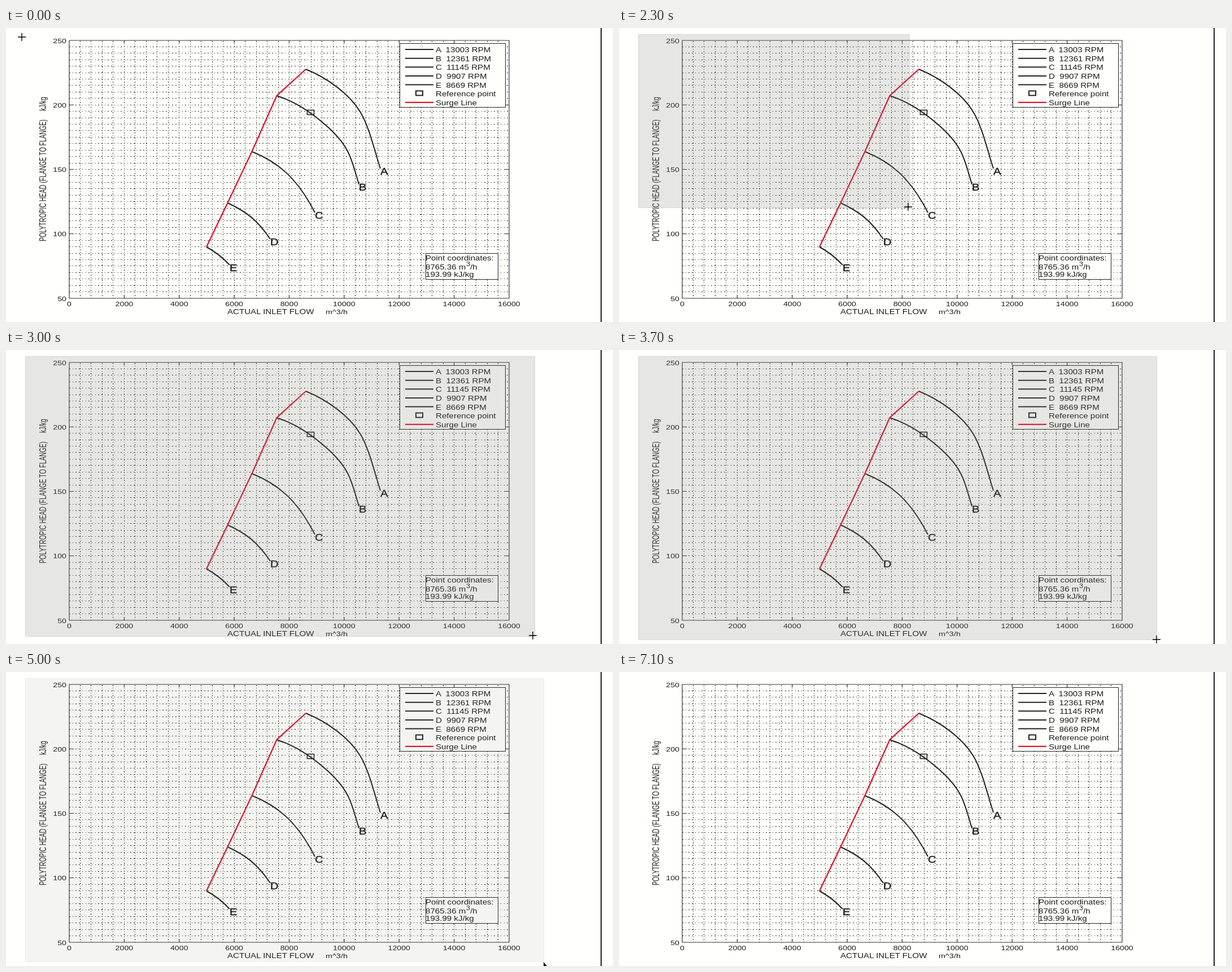
Write an HTML page that moves like this. It is 1075 px wide and 521 px high and loops after 7500 ms.

```html
<!DOCTYPE html>
<html lang="en">
<head>
<meta charset="utf-8">
<title>Compressor map</title>
<style>
html, body { margin: 0; width: 100%; height: 100%; overflow: hidden; background: #fffffb; }
svg { display: block; width: 1075px; height: 521px; }
text { font: 12px "Liberation Sans", Arial, sans-serif; fill: #1c1c1c; white-space: pre; }
.line { fill: none; stroke: #20241e; stroke-width: 2; }
.red { fill: none; stroke: #e2142e; stroke-width: 2.3; }
.frame { fill: #fffffb; stroke: #222; }
.grid { fill: none; stroke: #222; shape-rendering: crispEdges; }
.columns { stroke-dasharray: 1.2 3.3; }
.rows { stroke-dasharray: 1.5 4.2; }
.axis { fill: none; stroke: #333; stroke-width: 1.2; }
.mark { stroke: #1c1c1c; stroke-width: .4; }
#selection { fill: rgb(130 132 132 / .2); stroke: rgb(110 110 110 / .22); }
</style>
</head>
<body>
<svg viewBox="0 0 1075 521">
  <g id="chart"></g>
  <g class="line">
    <path class="curve" d="M531 73C570 89 608 117 627 148C643 174 652 215 663 249"/>
    <path class="curve" d="M479.5 120C515 131 546 153 576 181C609 213 612 233 625 277"/>
    <path class="curve" d="M435.5 219C480 237 515 264 547 327"/>
    <path class="curve" d="M392.5 310C425 325 445 340 468 374"/>
    <path class="curve" d="M355 388C372 397 384 407 396 420"/>
    <rect x="533.5" y="145.5" width="12" height="8" stroke-width="1.6"/>
  </g>
  <path class="red" d="M355 388L392.5 310L435.5 219L479.5 120L531 73"/>
  <rect class="frame" x="697.5" y="27.5" width="187" height="113"/>
  <rect class="frame" x="743.5" y="399.5" width="128" height="46"/>
  <g id="labels"></g>
  <path d="M1054 0V521" stroke="#222" stroke-width="2"/>
  <rect id="selection" x="34.5" y="11.5"/>
  <path id="cross" d="M-7 0H7M0 -7V7" stroke="#000" stroke-width="1.4"/>
  <path id="arrow" d="M0 0V14L3 11L5.2 15L7 14.2L5 10.2H9Z" fill="#1a1a1a"/>
</svg>
<script>
const $ = id => document.getElementById(id);
const LEFT = 112, RIGHT = 891, TOP = 22, BOTTOM = 479;
const flowX = v => LEFT + (RIGHT - LEFT) * v / 16000;
const headY = v => BOTTOM - (BOTTOM - TOP) * (v - 50) / 200;

// The chart image is shown wider than its natural proportions.
const label = (x, y, str, { size = 12, anchor = "start", cls = "" } = {}) =>
  `<text class="${cls}" transform="translate(${x} ${y}) scale(1.26 1)" style="font-size:${size}px" text-anchor="${anchor}">${str}</text>`;
const sideLabel = (y, str) =>
  `<text transform="translate(71 ${y}) rotate(-90) scale(.887 1.3)">${str}</text>`;

let columns = "", rows = "", ticks = "", labels = "";
for (let v = 400; v < 16000; v += 400) columns += `M${flowX(v)} ${BOTTOM}V${TOP}`;
for (let v = 55; v < 250; v += 5) rows += `M${LEFT} ${headY(v)}H${RIGHT}`;
for (let v = 0; v <= 16000; v += 2000) {
  ticks += `M${flowX(v)} ${BOTTOM}v-6M${flowX(v)} ${TOP}v5`;
  labels += label(flowX(v), 493, v, { size: 11.3, anchor: "middle" });
}
for (let v = 50; v <= 250; v += 50) {
  ticks += `M${LEFT} ${headY(v)}h8M${RIGHT} ${headY(v)}h-8`;
  labels += label(107, headY(v) + 4.5, v, { size: 11.3, anchor: "end" });
}
$("chart").innerHTML = `<path class="grid columns" d="${columns}"/>
  <path class="grid rows" d="${rows}"/>
  <path class="axis" d="M${LEFT} ${TOP}H${RIGHT}V${BOTTOM}H${LEFT}Z${ticks}"/>`;

const legendY = i => 38 + i * 15.65;
const legendText = (i, str) => label(761, legendY(i) + 5, str);
const legendLine = (i, cls) => `<path class="${cls}" d="M707 ${legendY(i)}H757"/>`;
const speeds = [13003, 12361, 11145, 9907, 8669];
document.querySelectorAll(".curve").forEach((curve, i) => {
  const end = curve.getPointAtLength(curve.getTotalLength()), name = "ABCDE"[i];
  labels += label(end.x, end.y + 10.5, name, { size: 16, cls: "mark" })
    + legendLine(i, "line") + legendText(i, `${name}  ${speeds[i]} RPM`);
});
labels += `<rect class="line" x="726" y="111.5" width="12" height="8" stroke-width="1.6"/>`
  + legendText(5, "Reference point") + legendLine(6, "red") + legendText(6, "Surge Line")
  + label(392, 507, "ACTUAL INLET FLOW") + label(566, 507, "m^3/h", { size: 11.5 })
  + label(743, 412, "Point coordinates:") + label(743, 428, "8765.36 m")
  + label(815, 422, "3", { size: 10 }) + label(822, 428, "/h") + label(743, 441, "193.99 kJ/kg")
  + sideLabel(378, "POLYTROPIC HEAD (FLANGE TO FLANGE)") + sideLabel(147, "kJ/kg");
$("labels").innerHTML = labels;

// Key points: [time, x, y]
const crossPath = [[0, 28, 16], [1000, 34, 12], [1600, 34, 12], [1800, 131, 101],
  [2400, 588, 360], [2600, 680, 413], [3000, 933, 506], [3200, 952, 513]];
const cornerPath = [[1600, 34, 12], [1800, 133, 101], [2400, 590, 361],
  [2600, 745, 453], [3000, 936, 507], [3200, 952, 513]];
const arrowPath = [[6300, 952, 514], [6500, 374, 182], [7000, 32, 5]];

function along(path, t) {
  const i = path.findIndex(key => key[0] > t);
  if (i < 1) return path.at(i).slice(1);
  const [t0, x0, y0] = path[i - 1], [t1, x1, y1] = path[i], k = (t - t0) / (t1 - t0);
  return [Math.round(x0 + (x1 - x0) * k), Math.round(y0 + (y1 - y0) * k)];
}

const show = (el, visible) => el.style.display = visible ? "" : "none";
function place(el, path, t, visible) {
  show(el, visible);
  el.setAttribute("transform", `translate(${along(path, t)})`);
}

function draw(now) {
  const t = Math.floor(now % 7500 / 100) * 100;
  place($("cross"), crossPath, t, t < 4600);
  place($("arrow"), arrowPath, t, t >= 4600 && t < 7100);

  const box = $("selection"), [x, y] = along(cornerPath, t);
  show(box, t >= 1700 && t < 5400);
  box.setAttribute("width", x - 34);
  box.setAttribute("height", y - 11);
  box.style.opacity = Math.min(1, (5400 - t) / 930);
  requestAnimationFrame(draw);
}
requestAnimationFrame(draw);
</script>
</body>
</html>
```
